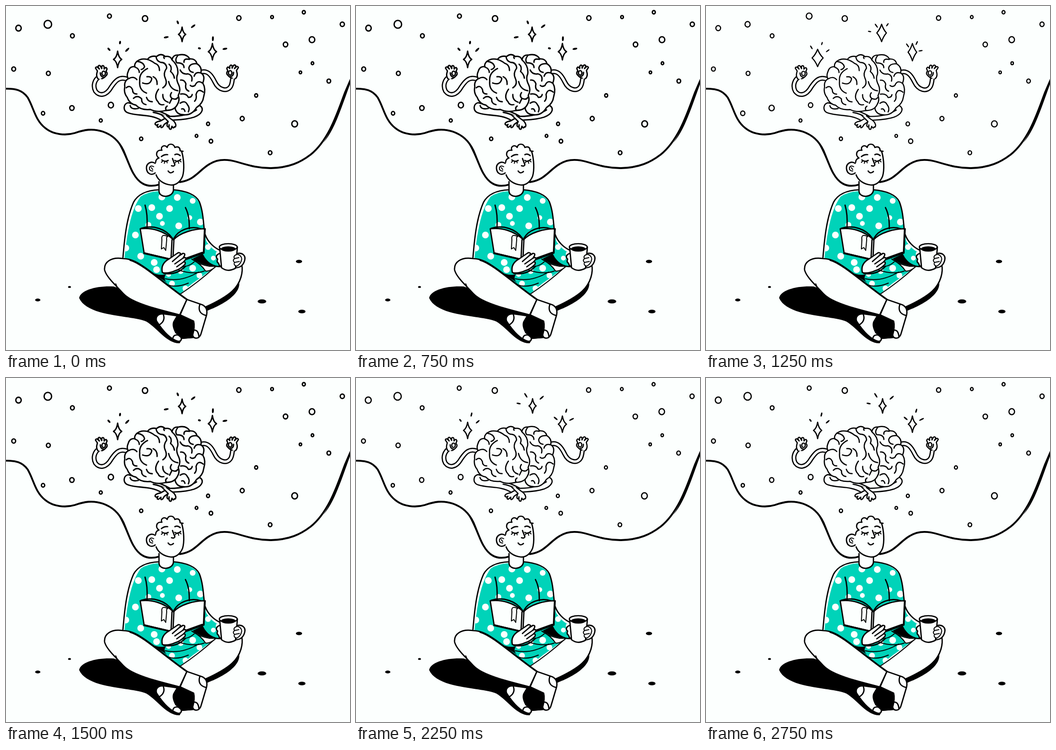
Write an HTML page that moves like this. It is 715x715 px and loops after 3 s.

```html
<!DOCTYPE html>
<html lang="en">
<head>
<meta charset="utf-8">
<title>Calm mind</title>
<style>
  html, body { margin: 0; width: 100%; height: 100%; overflow: hidden; background: #fcfffe; }
  svg { display: block; width: 100vw; height: 100vh; }
  .ink { fill: none; stroke: #000; stroke-width: 2.7; stroke-linecap: round; stroke-linejoin: round; }
  .paper { fill: #fcfffe; }
  .black { fill: #000; stroke: none; }
  .teal { fill: #00d3b9; stroke: none; }
  .thin { stroke-width: 2; }
</style>
</head>
<body>
<svg viewBox="0 0 715 715" class="ink">
  <defs>
    <clipPath id="shirtClip"><use href="#shirt"/></clipPath>
    <g id="hand">
      <path class="paper" d="M192 152C186 146 189 139 190 135L186 129Q187 125 191 128L194 131L191 126Q194 121 197 126L199 130L199 125Q203 122 204 127L204 131Q208 125 210 131L208 136Q213 141 207 146Q202 151 199 151"/>
      <ellipse cx="203" cy="140" rx="3.6" ry="4.6"/>
      <path d="M196 139Q196 147 203 148"/>
    </g>
    <g id="brain">
      <g id="arms"></g>
      <path class="paper" d="M254 201C244 203 243 216 251 221C270 230 300 223 323 238L342 230C310 212 285 210 254 201Z"/>
      <path d="M258 207Q260 216 275 213M306 221Q320 223 337 233"/>
      <path class="paper" d="M403 207C413 214 407 225 391 231C370 238 352 236 335 238L330 229C360 231 380 226 396 216"/>
      <path class="paper" d="M337 230L321 239Q309 241 310 246Q312 249 316 246Q312 252 317 252L322 248Q321 256 326 251L329 246L339 239"/>
      <path class="paper" d="M324 227L337 240Q333 248 336 251Q339 252 339 247Q338 258 343 256L345 250Q348 256 350 251Q353 253 353 247Q351 239 343 235L334 228"/>
      <path class="paper" d="M345 112Q347 101 358 102Q375 98 382 110Q394 109 397 120Q408 127 405 139Q415 145 409 160Q416 172 411 188Q409 203 396 211Q386 228 369 226Q356 226 352 215Z"/>
      <path class="paper" d="M345 112Q342 103 331 105Q322 97 313 105Q301 102 294 111Q281 108 272 115Q266 121 268 126Q257 125 254 136Q250 145 254 151Q245 157 247 168Q244 180 252 190Q257 204 270 206Q280 217 300 215Q314 222 333 217Q350 217 356 205Q362 196 358 186Q364 175 359 164Q352 151 357 141Q359 124 345 112Z"/>
      <path d="M273 115Q286 117 288 126Q286 131 281 132M294 111Q303 114 309 119Q319 122 319 134M312 106Q313 114 321 117Q333 117 334 129Q326 140 331 150Q337 163 326 170"/>
      <path d="M268 127Q277 130 277 138M255 151Q265 145 272 153M294 130Q276 139 278 156Q276 175 292 181M284 160Q300 166 303 151Q301 146 293 147M306 147Q315 151 314 163"/>
      <path d="M250 170Q258 163 263 174Q263 183 272 183M265 192Q273 184 282 193Q281 203 291 205M292 190Q295 199 304 199M317 173Q306 189 316 199Q319 207 328 205M326 184Q325 196 337 200M344 180Q339 187 345 192L340 202M345 192Q354 196 357 190M333 217Q330 211 335 208"/>
      <path d="M339 121Q346 127 342 136Q349 142 350 150M338 157Q342 174 357 176M329 109Q326 104 331 105M357 103Q350 112 355 118Q370 118 370 128M381 111Q369 108 370 117M396 120Q382 119 380 129Q381 137 389 138M362 133Q367 143 378 141Q389 144 386 156M404 139Q394 136 391 146M363 154Q371 153 374 162Q371 173 380 177M408 160Q398 153 393 165Q387 169 383 165M410 179Q399 170 395 184Q397 193 392 198M363 183Q375 181 379 190Q386 190 387 184M362 202Q372 195 377 205Q383 212 379 220M365 214Q370 212 372 219"/>
    </g>
  </defs>

  <!-- thought cloud edge -->
  <g stroke-width="3.8">
    <path d="M-3 172C20 171 34 175 45 190C58 212 60 237 82 254C98 267 123 270 143 264C163 257 180 254 201 261C222 268 235 281 244 300C256 328 264 358 284 369C296 376 309 374 319 371"/>
    <path d="M361 366C393 362 402 340 424 328C440 318 460 318 480 324C510 333 527 337 550 337C589 336 612 325 633 309C673 277 691 215 705 179L718 149"/>
  </g>
  <path class="black" d="M228 276C249 294 255 332 272 358C256 341 249 310 228 276ZM660 284C684 256 697 211 716 160V151C695 203 684 247 660 284Z"/>

  <g class="black">
    <ellipse cx="66" cy="611" rx="5.5" ry="3"/><ellipse cx="132" cy="584" rx="3" ry="2"/>
    <ellipse cx="609" cy="531" rx="6.5" ry="3.5"/><ellipse cx="532" cy="614" rx="9" ry="4.3"/>
    <ellipse cx="615" cy="635" rx="7.5" ry="3.8"/>
    <path d="M152 607C155 590 190 581 224 583L270 600L365 640L392 655V690L366 692L361 701C335 702 315 670 292 656C260 642 170 647 152 607Z"/>
    <path d="M414 624C450 610 478 590 484 570C492 598 450 622 414 635Z"/>
  </g>

  <!-- legs -->
  <path class="paper" d="M437 541C425 554 385 578 362 599L377 611L415 625C445 612 470 597 482 575Q492 560 490 537Z" stroke="none"/>
  <path d="M490 538C493 551 489 576 470 593C455 606 436 616 416 625"/>

  <!-- sweater -->
  <path id="shirt" class="teal" d="M317 385C321 399 344 399 349 383C374 385 394 394 402 409C409 426 409 450 412 468L416 488C424 502 436 510 443 513L449 541Q441 544 434 542C414 560 384 576 362 599C330 578 300 550 263 531L246 526C251 478 258 425 280 396Q295 386 317 385Z"/>
  <g id="dots" class="paper" clip-path="url(#shirtClip)" stroke="none"></g>
  <path d="M318 382C294 383 274 391 265 408C250 442 246 487 243 524M348 382C374 384 395 392 402 407C409 425 410 445 412 464"/>
  <path class="paper" d="M318 365V384C318 400 346 399 348 383V370"/>
  <path d="M289 414C294 430 294 445 293 461M373 419C381 435 381 450 381 463"/>
  <path d="M414 475C419 490 432 502 445 508M409 519C416 533 433 544 449 541"/>
  <path class="black" d="M301 553Q316 561 332 558Q326 568 335 575Z"/>
  <path class="paper thin" d="M386 526Q402 538 423 541L437 541Q424 552 415 551Q404 535 386 526Z"/>
  <path class="black" d="M388 525L409 515Q416 531 434 541Q403 539 388 525Z"/>
  <path class="thin" d="M331 567Q365 574 400 553M337 580Q355 586 379 576M359 549Q390 559 412 551M365 542Q380 542 391 532M434 543Q400 574 362 599"/>

  <!-- front leg -->
  <path class="paper" d="M243 525C219 521 203 532 205 549C209 564 229 581 244 598C262 618 318 631 361 642L376 610C335 581 292 542 268 531Q255 525 243 525Z"/>
  <path d="M228 578C235 597 252 611 276 619"/>
  <path stroke-width="3.4" d="M258 528C282 534 330 578 376 610"/>

  <!-- socks -->
  <path class="paper" d="M328 640C316 639 310 646 313 655C325 674 340 692 358 697Q366 697 364 689L353 679Q345 664 349 656L356 644Z"/>
  <path d="M327 641Q332 655 318 663M347 690Q349 681 361 685"/>
  <path class="black" d="M347 657L362 643L390 656L389 690L366 692L362 681L352 678Z"/>
  <path class="paper" d="M376 610L362 642L390 655Q393 666 388 684Q390 692 398 690Q404 688 406 679L417 642Q420 627 408 621Z"/>
  <path d="M403 620Q397 638 415 643M389 674Q399 671 401 687"/>

  <!-- book -->
  <path class="paper" d="M279 463L287 513L345 527L372 525L411 511L414 463C390 463 362 471 348 486C330 468 303 460 279 463Z"/>
  <path d="M281 462C306 454 333 464 346 483M349 483C358 466 382 456 405 463M345 486L343 526M349 486L347 526"/>
  <path stroke-width="3.6" d="M287 514L344 527M372 527L411 513M413 464L411 512"/>
  <path class="paper thin" d="M336 479Q322 472 324 486L323 505L328 502L332 508L334 486Q333 480 336 479"/>

  <!-- hand on the book -->
  <path class="paper" d="M325 554C322 542 327 532 340 525L356 514Q361 511 363 515L360 519L368 514Q373 514 371 519L368 524Q374 521 374 526L369 532Q374 531 372 537Q361 548 352 550Q337 557 325 554Z"/>
  <path d="M360 519L346 531M368 524L351 536M369 532L355 542M328 556Q355 560 373 541"/>

  <!-- cup -->
  <path class="paper" d="M479 515C491 511 499 519 496 529C493 540 486 545 474 544M449 514C437 514 435 522 440 526Q437 532 442 535Q443 542 451 543"/>
  <path class="paper" d="M444 501L448 544Q461 554 477 545L481 501Z"/>
  <ellipse class="paper" cx="462" cy="501" rx="18.5" ry="7"/>
  <ellipse class="black" cx="462" cy="505" rx="15" ry="5.5"/>
  <path class="paper thin" d="M481 516Q471 519 475 525Q470 529 475 533Q472 538 479 541Q488 537 490 526Q489 518 481 516ZM475 525L484 523M475 533L485 531"/>

  <!-- head -->
  <path class="paper" d="M365 303C370 318 371 341 367 354C362 366 353 373 342 372C327 370 316 362 312 351L311 326C311 321 314 318 317 314C309 307 313 299 323 299C321 291 330 288 335 293C338 285 348 285 351 293C359 290 364 295 365 303Z" stroke="none"/>
  <path d="M365 302C370 318 371 341 367 354C362 366 353 373 342 372C327 370 316 362 312 351M311 325Q311 318 318 316C309 310 313 298 324 300C320 292 330 287 335 294C337 285 348 285 351 294C359 291 362 295 362 301L368 302"/>
  <path class="paper" d="M310 327C301 321 291 328 292 338C293 349 303 353 310 347"/>
  <path class="thin" d="M307 334Q300 330 298 337Q298 343 305 343M302 336L305 340"/>
  <path d="M323 313Q329 308 336 309M351 309Q357 306 362 311M324 320Q330 325 337 321M351 321Q357 325 363 319M346 317L351 330Q350 334 344 332M337 343Q342 350 348 344"/>
  <path class="thin" d="M326 322L323 325M330 324L329 327M334 323L335 326M354 323L352 326M358 324L359 327M361 322L364 324"/>

  <g id="mind"></g>
</svg>
<script>
const NS = 'http://www.w3.org/2000/svg';
const byId = id => document.getElementById(id);
const add = (parent, tag, attrs) => {
  const el = document.createElementNS(NS, tag);
  for (const key in attrs) el.setAttribute(key, attrs[key]);
  return parent.appendChild(el);
};
const triples = text => text.split(';').map(t => t.trim().split(' ').map(Number));

triples(`324 397 7;356 398 7;388 405 6;275 421 7;303 419 7;340 421 7;319 437 7;382 440 5;
  404 449 7;296 455 6;359 457 7;325 452 5;269 476 7;249 503 7;280 520 7;308 533 7;313 548 7;
  420 501 6;431 524 5;441 515 5;388 545 7;363 551 6;345 577 6;373 587 6;402 560 6;338 558 5`)
  .forEach(([cx, cy, r]) => add(byId('dots'), 'circle', { cx, cy, r }));

// Tube limbs: a wide dark line with a light core.
['M254 153C235 144 226 158 219 168C207 189 193 186 186 177C180 166 184 153 194 147',
 'M403 138C420 132 428 146 434 158C442 175 460 179 467 167C471 160 470 152 472 145'].forEach(d => {
  add(byId('arms'), 'path', { d, 'stroke-width': 10 });
  add(byId('arms'), 'path', { d, stroke: '#fcfffe', 'stroke-width': 5 });
});
add(byId('arms'), 'use', { href: '#hand' });
add(byId('arms'), 'use', { href: '#hand', transform: 'translate(669 -1) scale(-1 1)' });

const bubbles = triples(`26 46 5.8;87 38 8;215 21 4.2;289 26 5.7;138 62 4.1;16 131 4.2;88 140 4.2;
  77 223 3.6;137 212 4.7;218 206 5.6;197 238 3.2;281 276 3.5;396 270 2.9;426 281 3.8;420 245 3.3;
  491 234 4.3;520 186 3.3;549 305 3.9;600 245 6.2;671 156 4;612 138 2.7;637 119 2.8;636 70 6;
  581 80 4.8;699 38 4.5;619 13 3.3;553 23 3;484 25 4.6`);

// Each pose: line weight, drift, bubble size changes, and stars as
// [x, y, width, height, rays as x y length].
const poses = {
  A: { weight: 2.8, pinch: .22, ray: 4, shift: 0, brain: '',
    grow: {},
    stars: [[232, 111, 8.5, 17, '237 76 5;214 90 6;252 91 9'],
            [366, 59, 7.5, 15, '357 34 6;389 42 9;333 65 8'],
            [429, 95, 8.5, 17, '430 68 8;402 88 4;455 89 8']] },
  B: { weight: 2.4, pinch: .38, ray: 2.6, shift: -.6, brain: 'translate(-.5 .2)',
    grow: { 0: -.7, 1: -2.5, 2: 2, 7: 1, 8: 1, 9: -.8, 13: .8, 14: .6 },
    stars: [[232, 108, 11.5, 18, '219 86 7;241 78 5;253 93 7'],
            [365, 56, 10, 18, '354 41 8;377 39 6;340 53 5'],
            [429, 96, 9, 18, '419 82 8;438 77 7;446 93 7']] },
  C: { weight: 2.5, pinch: .25, ray: 3.1, shift: -.5, brain: 'translate(-.3 -.2)',
    grow: { 0: .6, 1: -.2, 6: .4, 9: -.4 },
    stars: [[232, 109, 8.5, 17, '217 88 5;240 76 7;253 91 8'],
            [367, 58, 7.5, 15, '353 36 9;386 41 9;338 53 7'],
            [429, 96, 8.5, 17, '415 84 8;437 68 7;448 86 9']] }
};

const starPath = (w, h, p) => {
  const a = w * p, b = h * p;
  return `M0 ${-h}Q${a} ${-b} ${w} 0Q${a} ${b} 0 ${h}Q${-a} ${b} ${-w} 0Q${-a} ${-b} 0 ${-h}Z`;
};

for (const pose of Object.values(poses)) {
  const g = pose.group = add(byId('mind'), 'g', { style: `stroke-width:${pose.weight}` });
  bubbles.forEach(([x, y, r], i) => add(g, 'ellipse', {
    cx: x + pose.shift, cy: y, rx: r + (pose.grow[i] || 0) - .2, ry: r + (pose.grow[i] || 0) + .2
  }));
  for (const [x, y, w, h, rays] of pose.stars) {
    add(g, 'path', { d: starPath(w, h, pose.pinch), transform: `translate(${x} ${y})` });
    for (const [rx, ry, len] of triples(rays)) {
      const turn = Math.atan2(ry - y, rx - x) * 180 / Math.PI;
      add(g, 'ellipse', { rx: len / 2 + 1, ry: pose.ray / 2, class: 'black',
        transform: `translate(${rx} ${ry}) rotate(${turn})` });
    }
  }
  add(g, 'use', { href: '#brain', transform: pose.brain });
}

const order = 'ACBACBACBCBC', step = 250;
const start = performance.now();
function draw(now) {
  const index = Math.floor(Math.max(0, now - start) / step) % order.length;
  for (const name in poses)
    poses[name].group.setAttribute('visibility', name === order[index] ? 'visible' : 'hidden');
  requestAnimationFrame(draw);
}
draw(start);
</script>
</body>
</html>
```
